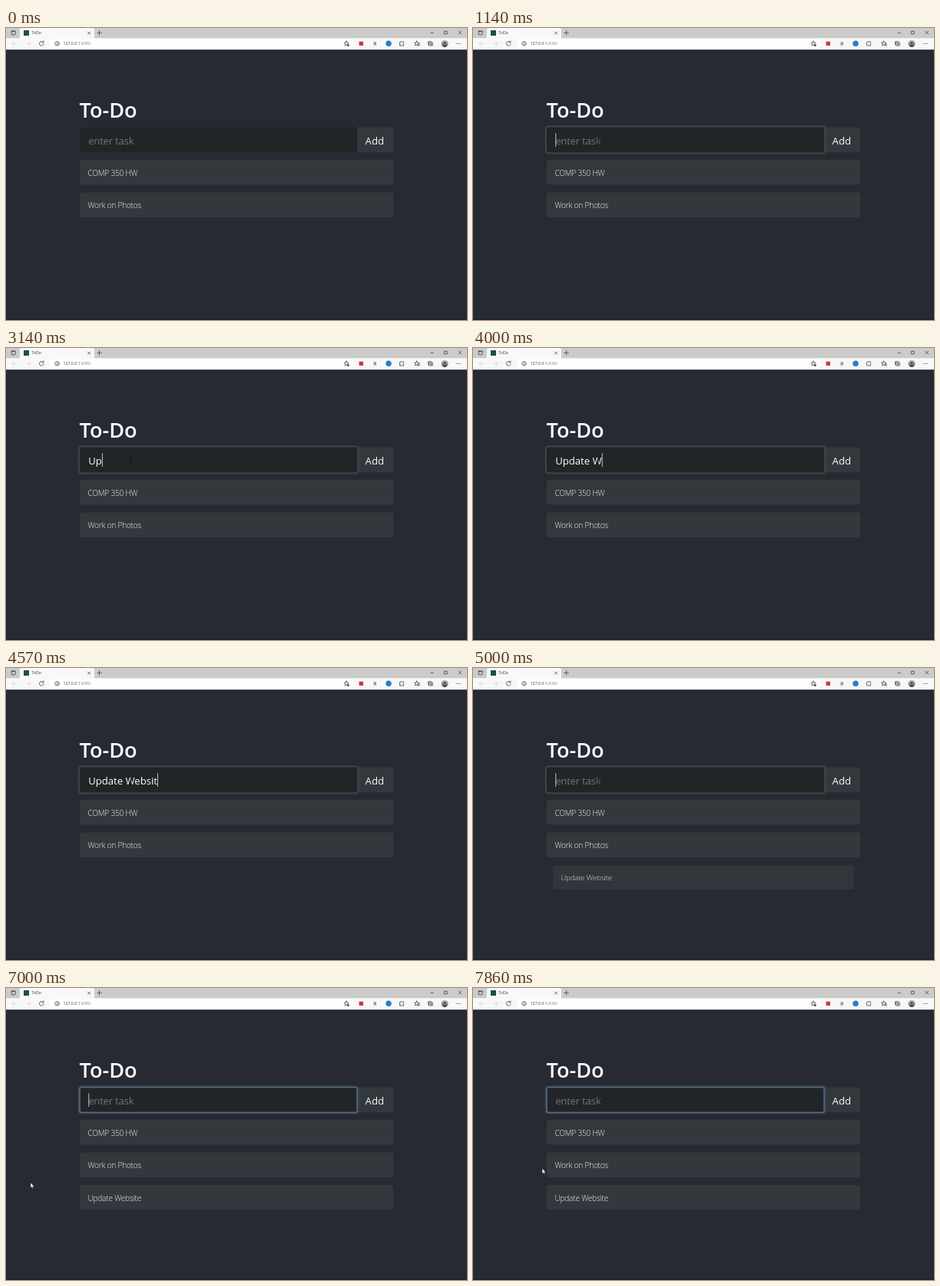
An HTML page that plays this animation: 600x381 px, repeating every 8 s.

```html
<!DOCTYPE html>
<html lang="en">
<head>
<meta charset="utf-8">
<title>ToDo</title>
<style>
  html, body { margin: 0; width: 100%; height: 100%; overflow: hidden; background: #282a33; }
  svg { display: block; width: 100%; height: 100%; }
  text { font-family: "Open Sans", "Noto Sans", sans-serif; fill: #fff; white-space: pre; }

  .heading { font-size: 27px; font-weight: 600; }
  .field { font-size: 13.1px; }
  .hint { fill: #70757a; letter-spacing: -.2px; }
  .task text { font-size: 10.1px; font-weight: 300; letter-spacing: -.2px; fill: #f4f4f4; }
  .task rect, .button { fill: #33383c; }
  .small { font-size: 5.2px; fill: #333; }
  .line { fill: none; stroke: #444; stroke-width: .8; stroke-linecap: round; stroke-linejoin: round; }
  .faint { stroke: #d2d2d2; }

  .ring, .edge, .added, .beam, .arrow { animation: 8s linear infinite; }
  .ring { animation-name: ring; }
  .edge { animation-name: edge; }
  .beam { animation-name: beam; animation-timing-function: step-end; }
  .arrow { animation-name: arrow; animation-timing-function: step-end; }
  .added { animation-name: added; animation-timing-function: step-end; transform-origin: 300px 273.2px; }

  @keyframes ring {
    0%, 1.74% { opacity: 0; }
    1.75% { opacity: .5; }
    3.62%, 100% { opacity: 1; }
  }
  @keyframes edge {
    0%, 82.1% { opacity: 0; }
    83.8%, 100% { opacity: 1; }
  }
  @keyframes beam {
    0% { opacity: 0; }
    3.62% { opacity: 1; }
    76.74%, 100% { opacity: 0; }
  }
  @keyframes added {
    0% { opacity: 0; transform: scale(.9); }
    60.74% { opacity: .45; transform: scale(.92); }
    62.49% { opacity: .88; transform: scale(.96); }
    64.24%, 100% { opacity: 1; transform: none; }
  }
  @keyframes arrow {
    0% { opacity: 0; transform: translate(76px, 150px); }
    76.74% { opacity: 1; transform: translate(76px, 150px); }
    78.62% { transform: translate(12px, 153.5px); }
    80.37% { transform: translate(2px, 165px); }
    82.12% { transform: translate(6px, 190px); }
    83.87% { transform: translate(14px, 214px); }
    85.74% { transform: translate(24px, 236px); }
    87.49% { transform: translate(32px, 254px); }
    89.24% { transform: translate(39px, 264px); }
    91.12% { transform: translate(70px, 268px); }
    92.87% { transform: translate(110px, 262px); }
    94.62% { transform: translate(142px, 250px); }
    96.37% { transform: translate(118px, 240px); }
    98.24%, 100% { opacity: 1; transform: translate(90px, 235.5px); }
  }
</style>
</head>
<body>
<svg viewBox="0 0 600 381" preserveAspectRatio="none">
  <defs>
    <linearGradient id="portrait" x2="0" y2="1">
      <stop offset="0" stop-color="#b9c3cc"/>
      <stop offset="1" stop-color="#59636f"/>
    </linearGradient>
  </defs>
  <rect width="600" height="381" fill="#282a33"/>
  <rect y="379.8" width="600" height="1.2" fill="#1d1f25"/>

  <!-- tab strip -->
  <rect width="600" height="14" fill="#cbcbcb"/>
  <path d="M18 14V2q0-2 2-2H113q2 0 2 2V14z" fill="#f8f8f8"/>
  <rect x="7.2" y="3.8" width="5" height="5" rx=".8" class="line"/>
  <path d="M7.2 4.6h5" class="line" stroke-width="1.4"/>
  <rect x="23" y="3" width="7" height="7" fill="#1d4f47"/>
  <text x="33.3" y="8.4" class="small">ToDo</text>
  <path d="M106.5 5l3.2 3.2m0-3.2l-3.2 3.2M118.7 6.3h5.6m-2.8-2.8v5.6" class="line"/>
  <path d="M553 6.2h3.4M570.7 4.3h3.5v3.5h-3.5zM588.8 4l3.8 3.8m0-3.8l-3.8 3.8" class="line" stroke-linecap="butt"/>

  <!-- toolbar -->
  <rect y="13.2" width="600" height="15" fill="#f8f8f8"/>
  <path d="M14 20.3H8m2.5-2.7L8 20.3l2.5 2.7M26 20.3h6m-2.5-2.7l2.5 2.7-2.5 2.7" class="line faint"/>
  <path d="M48.6 18.6a2.9 2.9 0 1 0 .5 2.3M48.9 16.9v2h-2" class="line"/>
  <rect x="57" y="14.6" width="394.5" height="11.8" rx="2" fill="#fff"/>
  <circle cx="66.5" cy="20.3" r="2.7" class="line" stroke-width=".6"/>
  <path d="M66.5 20v1.5m0-2.7v.1" class="line"/>
  <text x="74.6" y="22.2" class="small">127.0.0.1<tspan fill="#888">:8080</tspan></text>
  <path id="star" d="M443 17l.9 2 2.2.2-1.6 1.5.5 2.2-2-1.1-2 1.1.5-2.2-1.6-1.5 2.2-.2z" class="line" stroke-width=".6"/>
  <circle cx="445.4" cy="22.4" r="1.5" fill="#555"/>
  <rect x="459.5" y="17.7" width="5.4" height="5.2" fill="#c9333f"/>
  <rect x="478.5" y="18.2" width="3.4" height="4.4" fill="#9a9a9a"/>
  <circle cx="498" cy="20.3" r="3.7" fill="#2f78d0"/>
  <path d="M513 18h1.5q.7-1.8 1.6 0h1.5v1.6q-1.8.7 0 1.6V23H513z" class="line"/>
  <use href="#star" x="91.5"/>
  <path d="M536.5 20.7h2M536 22.7h2.5" class="line"/>
  <path d="M549.5 21.7v-4h4M551 19h4.3v4H551zM553.2 20v2m-1-1h2" class="line"/>
  <circle cx="571" cy="20.3" r="4.6" fill="url(#portrait)"/>
  <path d="M567.8 23.6q3.2-4.2 6.4 0-3.2 2.6-6.4 0z" fill="#444d59"/>
  <circle cx="571" cy="19.2" r="1.5" fill="#444d59"/>
  <g fill="#444"><circle cx="586.6" cy="20.3" r=".6"/><circle cx="588.9" cy="20.3" r=".6"/><circle cx="591.2" cy="20.3" r=".6"/></g>

  <!-- page -->
  <text x="95.6" y="117" class="heading">To-Do</text>
  <path class="button" d="M456.5 129.6H501q3 0 3 3v26.6q0 3-3 3h-44.5z"/>
  <text x="467.6" y="151.6" class="field">Add</text>
  <rect class="ring" x="93.6" y="127.2" width="366" height="37.4" rx="4.5" fill="#3d4246"/>
  <path d="M99 129.6H457v32.6H99q-3 0-3-3v-26.6q0-3 3-3z" fill="#212528"/>
  <rect class="edge" x="96" y="129.8" width="361" height="32.4" rx="2" fill="none" stroke="#5c83b0" stroke-width="1.1"/>
  <text id="hint" x="107.2" y="151.6" class="field hint">enter task</text>
  <text id="typed" x="107.2" y="151.6" class="field"></text>
  <rect id="caret" y="137.3" width=".8" height="17.6" fill="#e4e4e4"/>

  <g class="task"><rect x="96" y="172" width="408" height="32.5" rx="3"/><text x="106.4" y="192.5">COMP 350 HW</text></g>
  <g class="task"><rect x="96" y="214.5" width="408" height="32.5" rx="3"/><text x="106.4" y="235">Work on Photos</text></g>
  <g class="task added"><rect x="96" y="257" width="408" height="32.5" rx="3"/><text x="106.4" y="277.6">Update Website</text></g>

  <path class="beam" d="M161.6 144.8h2.4m-1.2 0v6.6m-1.2 0h2.4" fill="none" stroke="#0c0d0e" stroke-width=".8"/>
  <path class="arrow" d="M0 0V6.6L1.5 5.3 2.5 7.6 3.6 7.1 2.6 4.9H4.6z" fill="#fff" stroke="#111" stroke-width=".4"/>
</svg>
<script>
  const LOOP = 8000;
  const TASK = "Update Website";
  const KEY_TIMES = [2860, 3140, 3290, 3430, 3570, 3570, 3710, 4000, 4140, 4290, 4430, 4570, 4570, 4710];
  const SUBMIT = 4860;
  const CARET_TOGGLES = [290, 570, 1140, 1710, 2140, 2710, 2860, 5290, 5860, 6430, 7000, 7570];

  const [hint, typed, caret] = ["hint", "typed", "caret"].map(id => document.getElementById(id));
  const passed = (times, t) => times.filter(at => at <= t).length;
  const show = (element, visible) => element.setAttribute("visibility", visible ? "visible" : "hidden");

  let start;
  function draw(now) {
    start ??= now;
    const t = (now - start) % LOOP;
    const text = t < SUBMIT ? TASK.slice(0, passed(KEY_TIMES, t)) : "";
    if (typed.textContent !== text) typed.textContent = text;
    show(hint, !text);
    show(caret, passed(CARET_TOGGLES, t) % 2);
    caret.setAttribute("x", 107.4 + (text ? typed.getComputedTextLength() : 0));
    requestAnimationFrame(draw);
  }
  requestAnimationFrame(draw);
</script>
</body>
</html>
```
